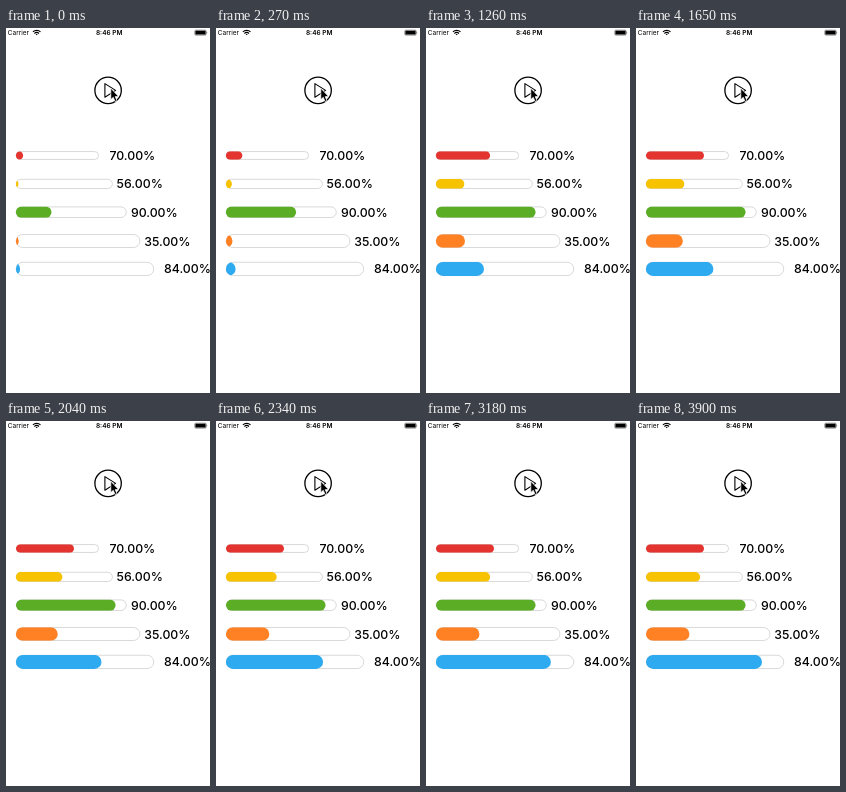
These frames come from a looping animation (204x365 px, 3930 ms). An HTML page:

```html
<!DOCTYPE html>
<html lang="en">
<head>
<meta charset="utf-8">
<title>Progress bars</title>
<style>
  html, body { margin: 0; width: 100%; height: 100%; overflow: hidden; background: #fff; }
  svg { display: block; width: 204px; height: 365px; font-family: Inter, "Liberation Sans", sans-serif; }
  .status { font-size: 6.5px; }
  .clock { font-weight: 600; text-anchor: middle; }
  .value { font-size: 12.3px; font-weight: 500; }
  .track { fill: #fff; stroke: #c9c9c9; stroke-width: .7; }
  .line { fill: none; stroke: #000; }
</style>
</head>
<body>
<svg viewBox="0 0 204 365">
  <g class="status">
    <text x="1.8" y="7">Carrier</text>
    <text class="clock" x="103.2" y="7">8:46 PM</text>
  </g>

  <g class="line" stroke-width="1.1">
    <path d="M26.9 3.9a5.4 5.4 0 0 1 7.6 0"/>
    <path d="M28.4 5.5a3.3 3.3 0 0 1 4.6 0"/>
    <path d="M30.7 7.3l-1-1a1.4 1.4 0 0 1 2 0z" fill="#000" stroke="none"/>
  </g>

  <rect class="line" x="188.8" y="2.2" width="11.4" height="4.9" rx="1.1" stroke-width=".45"/>
  <rect x="189.4" y="2.8" width="10.2" height="3.7" rx=".6"/>
  <path d="M200.8 3.8q.9.8 0 1.7z"/>

  <circle class="line" cx="102.1" cy="62.4" r="13.2" stroke-width="1.3"/>
  <path class="line" d="M98.9 55.6L109.6 62.4 98.9 69.2z" stroke-width="1.1" stroke-linejoin="round"/>
  <path d="M104.8 60.2v11.4l2.5-2.3 1.8 4.3 1.9-.8-1.8-4.2h3.4z" stroke="#fff" stroke-width=".7"/>

  <g id="bars"></g>
</svg>

<script>
const LOOP = 3930, STEP = 30, LEAD = 540, LEFT = 9.9;

const bars = [
  { y: 127.5, w: 83,    h: 8.6,  value: 70, color: '#e3342f', time: 2200, labelX: 103.4 },
  { y: 155.9, w: 96.8,  h: 9.9,  value: 56, color: '#f7c200', time: 3500, labelX: 110.6 },
  { y: 184.2, w: 110.7, h: 11.3, value: 90, color: '#5aad24', time: 1300, labelX: 124.9 },
  { y: 213,   w: 124.4, h: 13.7, value: 35, color: '#ff8123', time: 3000, labelX: 138.2 },
  { y: 240.9, w: 138.2, h: 14,   value: 84, color: '#2eaaf0', time: 4000, labelX: 158 }
];

function add(parent, tag, attrs) {
  const el = document.createElementNS('http://www.w3.org/2000/svg', tag);
  for (const key in attrs) el.setAttribute(key, attrs[key]);
  return parent.appendChild(el);
}

function build(bar, i) {
  const root = document.getElementById('bars');
  const { y, w, h } = bar;
  const box = { x: LEFT, y: y - h / 2, width: w, height: h, rx: h / 2 };
  const inset = {
    x: LEFT + .35, y: box.y + .35, width: w - .7, height: h - .7, rx: h / 2 - .35
  };
  add(root, 'rect', { class: 'track', ...inset });

  add(add(root, 'clipPath', { id: 'clip' + i }), 'rect', box);
  const group = add(root, 'g', { 'clip-path': `url(#clip${i})` });
  bar.length = w * bar.value / 100;
  bar.fill = add(group, 'rect', { ...box, width: bar.length, fill: bar.color });

  const label = add(root, 'text', { class: 'value', x: bar.labelX, y: y + 4.5 });
  label.textContent = bar.value.toFixed(2) + '%';
}

// cubic-bezier(.42, 0, .58, 1), solved by bisection
function easeInOut(x) {
  if (x >= 1) return 1;
  let lo = 0, hi = 1;
  for (let i = 0; i < 24; i++) {
    const s = (lo + hi) / 2, r = 1 - s;
    if (1.26 * s * r * r + 1.74 * s * s * r + s * s * s < x) lo = s; else hi = s;
  }
  return lo * lo * (3 - 2 * lo);
}

// each fill slides in from the left behind its rounded track
function draw(now) {
  const t = Math.floor((now % LOOP) / STEP) * STEP + LEAD;
  for (const bar of bars) {
    const shift = (easeInOut(t / bar.time) - 1) * bar.length;
    bar.fill.setAttribute('x', LEFT + shift);
  }
}

bars.forEach(build);
const start = performance.now();
function tick() {
  draw(performance.now() - start);
  requestAnimationFrame(tick);
}
tick();
</script>
</body>
</html>
```
